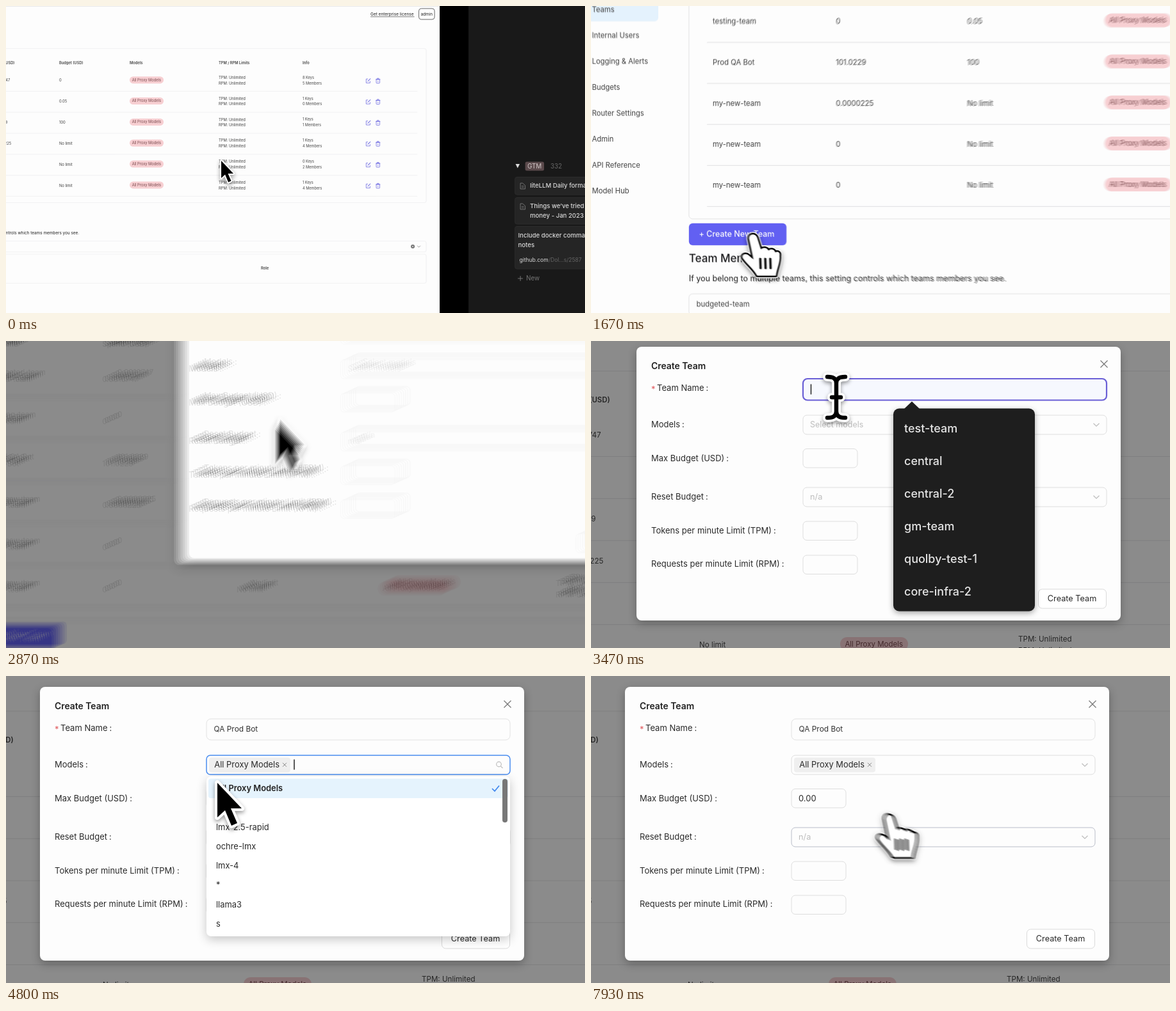
Write an HTML page with a canvas that moves like this. It is 904x480 px and loops after 8 s.

```html
<!DOCTYPE html>
<html lang="en">
<head>
<meta charset="utf-8">
<title>Create Team</title>
<style>
html, body { margin: 0; width: 904px; height: 480px; overflow: hidden; background: #fdfdfd; }
canvas { display: block; width: 904px; height: 480px; }
</style>
</head>
<body>
<canvas width="904" height="480"></canvas>
<script>
const W = 904, H = 480, LOOP = 8000, STEP = 1000 / 15;
const SHUTTER = 33, SAMPLES = 8;
const out = document.querySelector('canvas').getContext('2d');
const buffer = document.createElement('canvas');
buffer.width = W;
buffer.height = H;
const g = buffer.getContext('2d');

// time, zoom, offset x, offset y
const CAMERA = [
  [0, 1, 0, 0], [1070, 1.578, 346, -161.4], [1870, 2, 433, -281], [2400, 2, 433, -281],
  [3300, 2, 3, -86], [3500, 2, 3, -86], [4250, 2, -15, -78]
];
// time, page x, page y
const POINTER = [
  [0, 336, 242], [100, 336, 242], [1070, 16.5, 343], [1750, -91.5, 320.5], [2350, -91.5, 320.5],
  [3150, 190, 87], [4200, 190, 87], [4480, 180, 113], [4560, 180, 113], [4750, 172.5, 122.5],
  [5150, 172.5, 122.5], [5550, 192, 134], [7400, 192, 134], [8200, 256, 154.4]
];

const clamp = v => Math.max(0, Math.min(1, v));
const fade = (t, from, span) => clamp((t - from) / span);
const during = (t, from, to) => t >= from && t < to;

// Monotone cubic through the keys; returns one value per column.
function track(keys, t) {
  const last = keys.length - 1;
  if (t <= keys[0][0]) return keys[0].slice(1);
  if (t >= keys[last][0]) return keys[last].slice(1);
  let i = 0;
  while (t > keys[i + 1][0]) i++;
  const rate = (k, c) => (keys[k + 1][c] - keys[k][c]) / (keys[k + 1][0] - keys[k][0]);
  const slope = (k, c) => {
    if (k === 0 || k === last) return 0;
    const a = rate(k - 1, c), b = rate(k, c);
    return a * b > 0 ? 2 * a * b / (a + b) : 0;
  };
  const span = keys[i + 1][0] - keys[i][0], u = (t - keys[i][0]) / span, v = 1 - u;
  return keys[i].slice(1).map((from, n) => {
    const c = n + 1, to = keys[i + 1][c];
    return from * (1 + 2 * u) * v * v + to * u * u * (3 - 2 * u)
      + span * u * v * (v * slope(i, c) - u * slope(i + 1, c));
  });
}

// Text is set at 8x and scaled down so that advances stay precise.
function text(s, x, y, size, color = '#444', weight = 400) {
  g.save();
  g.translate(x, y);
  g.scale(1 / 8, 1 / 8);
  g.font = `${weight} ${size * 8}px Inter, "Open Sans", sans-serif`;
  g.textBaseline = 'middle';
  g.fillStyle = color;
  g.fillText(s, 0, 0);
  g.restore();
}

function box(x, y, w, h, r, fill, stroke, width = 1) {
  g.beginPath();
  g.roundRect(x, y, w, h, r);
  if (fill) { g.fillStyle = fill; g.fill(); }
  if (stroke) { g.strokeStyle = stroke; g.lineWidth = width; g.stroke(); }
}

function line(color, width, ...p) {
  g.beginPath();
  for (let i = 0; i < p.length; i += 2) g.lineTo(p[i], p[i + 1]);
  g.strokeStyle = color;
  g.lineWidth = width;
  g.stroke();
}

function shadow(color, blur, y = 0) {
  g.shadowColor = color;
  g.shadowBlur = blur;
  g.shadowOffsetY = y;
}
const noShadow = () => shadow('transparent', 0);

const chevron = (x, y, r, color, width) => line(color, width, x - r, y - r / 2, x, y + r / 2, x + r, y - r / 2);
const cross = (x, y, r, color, width) => {
  line(color, width, x - r, y - r, x + r, y + r);
  line(color, width, x - r, y + r, x + r, y - r);
};

const ROWS = [
  ['budgeted-team', '0.0010747', '0', 8, 5],
  ['testing-team', '0', '0.05', 1, 0],
  ['Prod QA Bot', '101.0229', '100', 1, 1],
  ['my-new-team', '0.0000225', 'No limit', 1, 4],
  ['my-new-team', '0', 'No limit', 0, 2],
  ['my-new-team', '0', 'No limit', 1, 4]
];
const MENU = ['Usage', 'Teams', 'Internal Users', 'Logging & Alerts', 'Budgets',
  'Router Settings', 'Admin', 'API Reference', 'Model Hub'];

function rowIcons(y) {
  const c = '#5f5be0';
  line(c, .7, 565, y - 2.6, 562.3, y - 2.6, 562.3, y + 3.6, 568.3, y + 3.6, 568.3, y + .6);
  line(c, 1, 564.6, y + 1.2, 569, y - 3.2);
  line(c, .7, 577, y - 2, 584.4, y - 2);
  line(c, .7, 579.4, y - 2, 579.4, y - 3.6, 582, y - 3.6, 582, y - 2);
  box(578, y - 2, 5.4, 6, .8, null, c, .7);
  line(c, .6, 580.7, y, 580.7, y + 2.5);
}

function drawTable() {
  box(-139.5, 66.5, 795.5, 241, 3, null, '#e6e6e8', .5);
  const heads = [['Team Name', -120.5], ['Spend (USD)', -22], ['Budget (USD)', 83],
    ['Models', 193], ['TPM / RPM Limits', 332], ['Info', 463]];
  for (const [s, x] of heads) text(s, x, 89.3, 5.7, '#444', 600);
  ROWS.forEach(([name, spend, budget, keys, members], i) => {
    const y = 116.7 + i * 32.85;
    text(name, -120.5, y, 5.8);
    text(spend, -22, y, 5.8);
    text(budget, 83, y, 5.8);
    box(193, y - 6.5, 53, 11, 5.5, '#f7cfd2');
    text('All Proxy Models', 196.7, y - .9, 5.75, '#7a4a4e');
    text('TPM: Unlimited', 332, y - 4.6, 5.8);
    text('RPM: Unlimited', 332, y + 4.2, 5.8);
    text(keys + ' Keys', 463, y - 4.6, 5.6);
    text(members + ' Members', 463, y + 4.2, 5.6);
    rowIcons(y);
    line('#e4e4e6', .5, -125, y + 16.6, 642, y + 16.6);
  });
}

function drawPage(t) {
  g.fillStyle = '#000';
  g.fillRect(677, -400, 45, 1200);
  g.fillStyle = '#191919';
  g.fillRect(722, -400, 600, 1200);
  g.fillStyle = '#fdfdfd';
  g.fillRect(-600, -400, 1277, 1200);
  line('#d4d4d4', 1, -600, 0, 677, 0);

  text('Get enterprise license', 569, 13, 6.5, '#222');
  line('#222', .6, 569, 16.8, 637.5, 16.8);
  box(644.5, 4, 24.5, 17, 4, '#fff', '#444', .8);
  text('admin', 647.5, 13, 6.4, '#222');

  box(-240, 130.8, 76, 18.4, 3, '#e4f2fd');
  MENU.forEach((s, i) => text(s, -217, 119.4 + i * 20.75, 5.75));

  drawTable();

  box(-139.5, 311, 78, 17.6, 3, during(t, 1700, 2600) ? '#4b3ad3' : '#6260f2');
  text('+ Create New Team', -131.5, 319.8, 6.4, '#fff', 500);
  text('Team Members', -139.5, 339.5, 8.7, '#1c1c1e', 500);
  text('If you belong to multiple teams, this setting controls which teams members you see.',
    -139.5, 355.5, 6.4, '#222');

  box(-139.5, 367.5, 795.5, 17, 3, null, '#e6e6e8', .5);
  text('budgeted-team', -133.5, 376, 5.8);
  g.beginPath();
  g.arc(635, 376, 3, 0, 7);
  g.fillStyle = '#777';
  g.fill();
  cross(635, 376, 1, '#fff', .6);
  chevron(644.5, 376, 2.3, '#777', .7);
  box(-139.5, 388, 795.5, 45.5, 3, null, '#e6e6e8', .5);
  text('Role', 398, 410.3, 5.8, '#444', 600);

  drawBoard();
}

function note(y) {
  line('#8a8a8a', .8, 806.5, y - 4.5, 803, y - 4.5, 803, y + 4.5, 810.5, y + 4.5, 810.5, y - 1, 806.5, y - 4.5);
  line('#8a8a8a', .7, 804.8, y, 808.6, y);
  line('#8a8a8a', .7, 804.8, y + 2.2, 808.6, y + 2.2);
}

function drawBoard() {
  g.beginPath();
  g.moveTo(795.5, 247);
  g.lineTo(802, 247);
  g.lineTo(798.7, 253.5);
  g.fillStyle = '#ddd';
  g.fill();
  box(810.5, 243.5, 29.5, 14, 2.5, '#5b4a4c');
  text('GTM', 814, 250.6, 9.8, '#d5cbcb');
  text('332', 850, 250.6, 9.8, '#6a6a6a');
  for (const [y, h] of [[267.5, 27.5], [299.5, 41.5], [344.5, 66.5]])
    box(794.5, y, 170, h, 3, '#252525', '#303030', .8);
  note(281.5);
  note(313.5);
  const c = '#dcdcdc';
  text('liteLLM Daily format', 818, 281.3, 9.6, c, 500);
  text('Things we’ve tried', 818, 313.2, 9.6, c, 500);
  text('money - Jan 2023', 818, 328, 9.6, c, 500);
  text('Include docker commands', 799.5, 359, 9.6, c, 500);
  text('notes', 799.5, 374, 9.6, c, 500);
  text('github.com', 801.5, 397.4, 8.5, c);
  text('/Dol...s/2587', 847, 397.4, 8.5, '#666');
  line('#777', 1, 799, 426, 807, 426);
  line('#777', 1, 803, 422, 803, 430);
  text('New', 812, 426.3, 9.8, '#777');
}

const LABELS = [['Team Name', 82], ['Models', 139], ['Max Budget (USD)', 191.7], ['Reset Budget', 252],
  ['Tokens per minute Limit (TPM)', 305], ['Requests per minute Limit (RPM)', 357.5]];

function drawModal(t) {
  const u = fade(t, 2133, 300);
  if (!u) return;
  g.fillStyle = `rgba(0,0,0,${.45 * u})`;
  g.fillRect(-600, -400, 1277, 1200);

  g.save();
  g.translate(7.5, 39);
  g.scale(.5, .5);
  const ease = 1 - (1 - u) ** 2.28, k = .2 + .8 * ease;
  g.translate(-203, 563);
  g.scale(k, k);
  g.translate(203, -563);
  g.globalAlpha = clamp(ease * 1.13);

  shadow('rgba(0,0,0,.28)', 14, 5);
  box(53, 17, 756, 428, 8, '#fdfdfd');
  noShadow();
  text('Create Team', 76, 48.3, 13.9, '#222', 600);
  cross(783, 44, 5.5, '#777', 1.3);
  text('*', 76, 84, 13, '#e05a5e');
  LABELS.forEach(([s, y], i) => {
    const x = i ? 76 : 85;
    text(s, x, y, 13, '#2a2a2a');
    text(':', x + labelWidth(s) + 3, y, 13, '#2a2a2a');
  });

  const edge = '#dedede', hint = '#bdbdbd', blue = '#4a8df0';
  const naming = during(t, 3260, 4530);
  if (naming) box(313, 67, 474, 33.5, 7, '#f6f8fe', '#6a5fd6', 2.2);
  else box(313, 67, 474, 33, 7, '#fdfdfd', '#e2e2e2');
  const name = 'QA Prod Bot'.slice(0, t < 3660 ? 0 : Math.floor((t - 3660) / 50) + 1);
  text(name, 324.5, 83.8, 11.9, '#333');
  if (naming) caret(325.5 + width(name, 11.9), 83.5);

  const open = Math.min(fade(t, 4460, 100), 1 - fade(t, 5270, 120));
  const picked = t >= 4730;
  box(313, 124, 474, 30, 6, '#fdfdfd', open > .5 ? blue : edge, open > .5 ? 1.5 : 1);
  if (picked) {
    box(317, 127.5, 127, 23, 4, '#efefef');
    text('All Proxy Models', 325.3, 138.8, 12.9, '#2a2a2a');
    cross(435, 138.8, 3, '#888', 1);
  } else {
    text('Select models', 324, 138.8, 12.5, hint);
  }
  if (open > .5) {
    g.beginPath();
    g.arc(769.5, 138, 3.8, 0, 7);
    g.strokeStyle = hint;
    g.lineWidth = 1.2;
    g.stroke();
    line(hint, 1.2, 772.3, 140.8, 775.5, 144);
    caret(picked ? 450 : 325, 138.5);
  } else {
    chevron(771, 139, 4.5, hint, 1.2);
  }

  const budgeting = during(t, 5600, 7660);
  box(313, 176.5, 85, 29.5, 6, '#fdfdfd', budgeting ? '#3f7fe0' : edge, budgeting ? 1.8 : 1);
  const digits = [6260, 6660, 6730, 6930].filter(at => t >= at).length;
  const amount = '0.00'.slice(0, digits);
  text(amount, 324, 191.7, 13, '#2a2a2a');
  if (budgeting) caret(324.8 + width(amount, 13), 191.5);
  if (during(t, 5600, 6270)) {
    line('#ddd', 1, 376, 178, 376, 205);
    line('#ddd', 1, 376, 191.3, 397, 191.3);
    chevron(387, 198.5, 2.6, '#aaa', 1);
    chevron(387, 185, -2.6, '#aaa', 1);
  }

  box(313, 237, 474, 30, 6, '#fdfdfd', t >= 7790 ? '#b9bdc9' : edge);
  text('n/a', 324, 252.3, 12.8, hint);
  chevron(771, 252, 4.5, hint, 1.2);
  box(313, 290, 85, 29.5, 6, '#fdfdfd', edge);
  box(313, 343, 85, 29.5, 6, '#fdfdfd', edge);
  box(680.5, 396, 106, 30, 6, '#fff', '#dadada');
  text('Create Team', 694.8, 411, 12.7, '#2a2a2a');

  if (during(t, 3330, 3660)) drawSuggestions();
  if (open > 0) drawOptions(open, picked);
  g.restore();
}

function width(s, size) {
  g.font = `400 ${size * 8}px Inter, "Open Sans", sans-serif`;
  return g.measureText(s).width / 8;
}
const labelWidth = s => width(s, 13);
const caret = (x, y) => line('#222', 1.5, x, y - 8, x, y + 8);

function drawSuggestions() {
  shadow('rgba(0,0,0,.35)', 10, 3);
  box(454, 113.5, 221, 317, 9, '#1e1e1e');
  noShadow();
  g.beginPath();
  g.moveTo(471, 114);
  g.lineTo(483, 102.5);
  g.lineTo(495, 114);
  g.fillStyle = '#1e1e1e';
  g.fill();
  ['test-team', 'central', 'central-2', 'gm-team', 'quolby-test-1', 'core-infra-2']
    .forEach((s, i) => text(s, 471, 145.5 + i * 51, 18, '#e6e6e6', 500));
}

function drawOptions(alpha, picked) {
  g.globalAlpha = alpha;
  shadow('rgba(0,0,0,.22)', 16, 5);
  box(313, 157, 474, 250, 7, '#fff');
  noShadow();
  box(316, 160.5, 468, 30.5, 4, picked ? '#e5f3fd' : '#f4f4f4');
  text('All Proxy Models', 328, 176, 12.9, '#222', picked ? 600 : 400);
  if (picked) line('#3f86ee', 1.7, 759, 176, 763, 180, 770, 171.5);
  ['lmx-2.5-rapid', 'ochre-lmx', 'lmx-4', '*', 'llama3', 's']
    .forEach((s, i) => text(s, 328, 236.7 + i * 30.25, 12.9, '#2a2a2a'));
  box(775, 161, 8, 68, 4, '#777');
}

const ARROW = new Path2D('M0 0V54L12 43L22 67L31 63L21 40H38Z');
const HAND = new Path2D('M-5 4C-6-4 5-6 8 2L14 21C18 17 24 18 26 23C30 19 36 21 37 26' +
  'C41 23 45 26 44 31C45 42 40 50 38 63H8C2 52-8 45-15 35C-18 29-10 26-5 31L2 37Z');
const BEAM = new Path2D('M-14-32C-6-32 0-30 0-22V22C0 30-6 32-14 32' +
  'M14-32C6-32 0-30 0-22M14 32C6 32 0 30 0 22M-7 0H7');

function outline(path, color, width) {
  g.strokeStyle = color;
  g.lineWidth = width;
  g.stroke(path);
}

function drawPointer(t, moment) {
  let alpha = 1;
  if (during(t, 3640, 5000)) alpha = Math.max(1 - fade(t, 3640, 130), fade(t, 4150, 130));
  if (t >= 6130) alpha = Math.max(1 - fade(t, 6200, 130), fade(t, 7260, 130));
  if (!alpha) return;
  const [x, y] = track(POINTER, moment);
  g.save();
  g.translate(x, y);
  g.scale(.5, .5);
  g.globalAlpha = alpha;
  g.lineJoin = g.lineCap = 'round';
  shadow('rgba(0,0,0,.4)', 6, 3);
  if (during(t, 1650, 2450) || t >= 7700) {
    outline(HAND, '#fff', 8);
    noShadow();
    outline(HAND, '#000', 5);
    g.fillStyle = '#fff';
    g.fill(HAND);
    for (const lx of [13, 21, 29]) line('#000', 3.4, lx, 36, lx + .5, 51);
  } else if (during(t, 3050, 4250) || t >= 5470) {
    outline(BEAM, '#fff', 14);
    noShadow();
    outline(BEAM, '#000', 6.5);
  } else {
    outline(ARROW, '#fff', 8);
    noShadow();
    g.fillStyle = '#000';
    g.fill(ARROW);
  }
  g.restore();
}

function drawScene(t, moment) {
  const [zoom, x, y] = track(CAMERA, moment);
  g.setTransform(zoom, 0, 0, zoom, x, y);
  g.globalAlpha = 1;
  drawPage(t);
  drawModal(t);
  drawPointer(t, moment);
}

// Average several moments within the shutter for motion blur.
function render(t) {
  for (let i = 0; i < SAMPLES; i++) {
    drawScene(t, t + (i / (SAMPLES - 1) - .5) * SHUTTER);
    out.globalAlpha = 1 / (i + 1);
    out.drawImage(buffer, 0, 0);
  }
}

let shown = -1;
function tick() {
  const step = Math.floor((performance.now() % LOOP + 4) / STEP) % 120;
  if (step !== shown) render(step * STEP);
  shown = step;
  requestAnimationFrame(tick);
}
tick();
</script>
</body>
</html>
```
